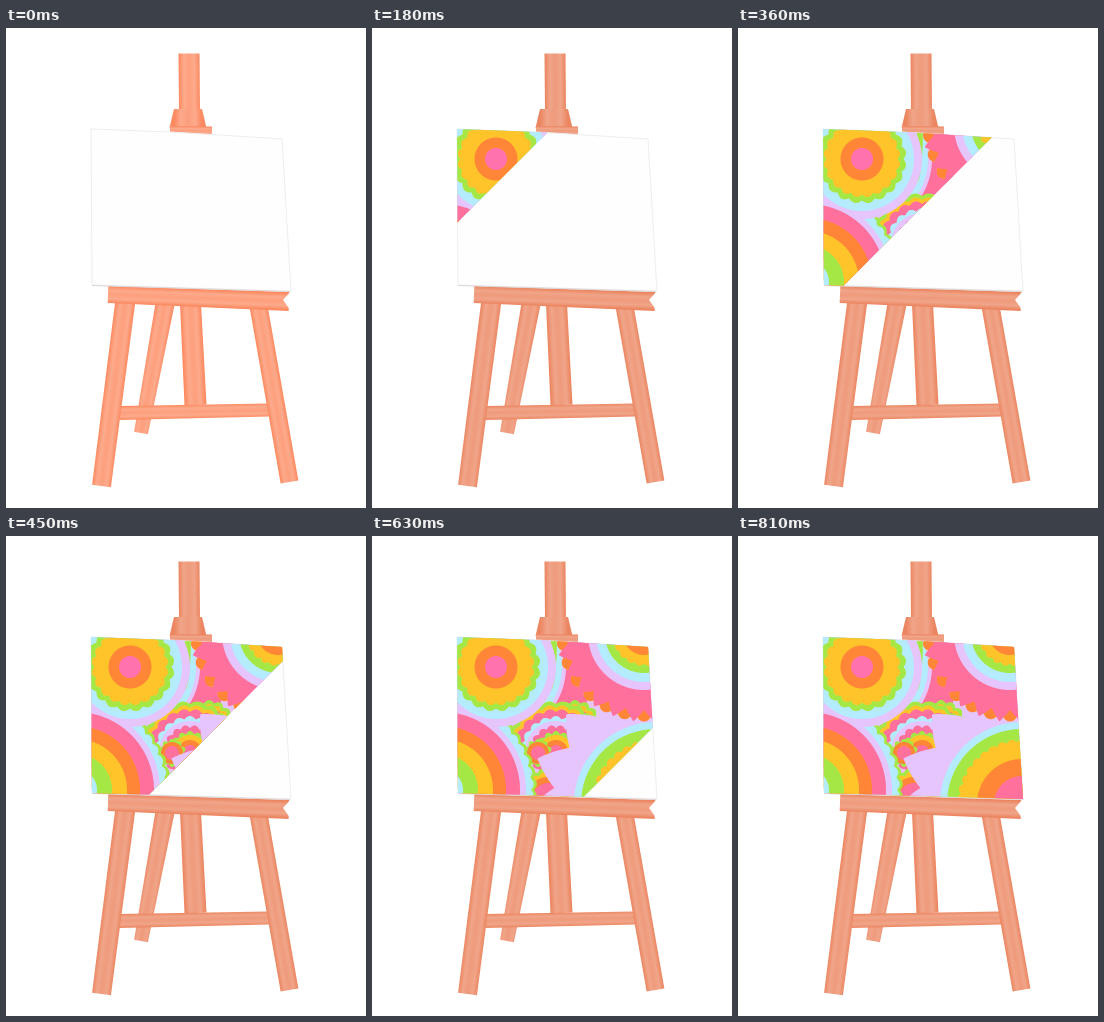
An HTML page with a canvas for the animation above (0.9 s loop, 360 by 480 pixels).

```html
<!DOCTYPE html>
<html lang="en">
<head>
<meta charset="utf-8">
<title>Easel</title>
<style>
html, body { margin: 0; width: 100%; height: 100%; overflow: hidden; background: #fff; }
canvas { display: block; width: 360px; height: 480px; }
</style>
</head>
<body>
<canvas id="stage" width="360" height="480"></canvas>
<script>
const ctx = document.getElementById('stage').getContext('2d');
const TAU = Math.PI * 2;
const STEP_MS = 90;
const STEPS = 10;

const PINK = '#ff709c', HUB = '#ff72ad', ORANGE = '#ff8636', YELLOW = '#ffc42a';
const GREEN = '#a5e846', SKY = '#b4ecfe', LILAC = '#e5c5fb';

const BOARD = [[85, 101], [164, 104], [206, 106.5], [276, 111], [285, 263], [86, 257]];

function path(points) {
  ctx.beginPath();
  points.forEach(([x, y]) => ctx.lineTo(x, y));
  ctx.closePath();
}

function fill(color) {
  ctx.fillStyle = color;
  ctx.fill();
}

function within(points, draw) {
  ctx.save();
  path(points);
  ctx.clip();
  draw();
  ctx.restore();
}

// Concentric shapes around one point; each edge is given by its radius at an angle.
function flower(x, y) {
  const outline = (color, radiusAt) => {
    ctx.beginPath();
    for (let i = 0; i < 720; i++) {
      const a = i / 720 * TAU, r = radiusAt(a);
      ctx.lineTo(x + r * Math.cos(a), y + r * Math.sin(a));
    }
    fill(color);
  };
  const self = {
    ring(color, r) {
      outline(color, () => r);
      return self;
    },
    scallop(color, r, lobes, depth = 3) {
      outline(color, a => r - depth * (1 - Math.abs(Math.sin(a * lobes / 2))));
      return self;
    },
    spikes(color, r, count, depth, tilt = 0) {
      outline(color, a => {
        const phase = (a - tilt + TAU) * count / TAU % 1;
        return r - depth * (1 - Math.abs(2 * phase - 1));
      });
      return self;
    },
    beads(color, distance, count, r) {
      for (let i = 0; i < count; i++) {
        const a = (i + 0.5) / count * TAU;
        flower(x + distance * Math.cos(a), y + distance * Math.sin(a)).ring(color, r);
      }
      return self;
    }
  };
  return self;
}

function paintArt() {
  ctx.fillStyle = LILAC;
  ctx.fillRect(80, 95, 210, 175);
  const upperLeft = flower(124, 131), lowerLeft = flower(70, 254);
  const upperRight = flower(272, 98), lowerRight = flower(284, 268);

  // Bands between the two upper flowers
  within([[170, 95], [215, 95], [215, 180], [165, 180]], () => {
    upperLeft.ring(PINK, 120).ring(LILAC, 70).ring(SKY, 66);
    ctx.beginPath();
    ctx.ellipse(181, 122, 3.5, 32, 0.05, 0, TAU);
    fill(GREEN);
  });

  // Layered blossoms in the middle
  flower(203, 190).scallop(GREEN, 26, 14).scallop(YELLOW, 22, 14).ring(PINK, 17);
  flower(184, 216).scallop(GREEN, 51, 20).scallop(YELLOW, 47, 20).scallop(PINK, 43, 20)
    .scallop(SKY, 36, 18).ring(LILAC, 31).scallop(PINK, 27, 16)
    .scallop(GREEN, 21, 14).ring(YELLOW, 17).ring(ORANGE, 12).ring(PINK, 7);
  flower(176, 262).scallop(GREEN, 30, 16).scallop(YELLOW, 26, 16).ring(ORANGE, 21).ring(PINK, 15);
  flower(166, 217).scallop(GREEN, 14, 10).ring(ORANGE, 11).ring(PINK, 7);

  // Left flowers overlap: outer bands first, then the cores
  lowerLeft.scallop(GREEN, 95, 46).scallop(SKY, 92, 46).ring(LILAC, 84);
  upperLeft.ring(LILAC, 60);
  lowerLeft.ring(PINK, 78).ring(ORANGE, 64).ring(YELLOW, 51).ring(GREEN, 36).ring(SKY, 21);
  upperLeft.ring(SKY, 52).scallop(GREEN, 44.5, 20).scallop(YELLOW, 38.5, 20)
    .ring(ORANGE, 21.5).ring(HUB, 11);

  lowerRight.spikes(LILAC, 127, 15, 24, 9 / 360 * TAU);
  upperRight.beads(YELLOW, 79, 26, 8).beads(ORANGE, 81, 26, 6.5).spikes(PINK, 88, 26, 12)
    .ring(LILAC, 56).ring(SKY, 48).ring(GREEN, 39).scallop(YELLOW, 32, 20, 2.5).ring(ORANGE, 21);
  lowerRight.ring(SKY, 82).ring(GREEN, 75).scallop(YELLOW, 65, 38).ring(ORANGE, 45).ring(PINK, 28);
}

// Tapered round bar, shaded across its width.
function bar(x0, y0, x1, y1, w0, w1, light) {
  const length = Math.hypot(x1 - x0, y1 - y0);
  const nx = (y1 - y0) / length / 2, ny = (x0 - x1) / length / 2;
  const g = ctx.createLinearGradient(x0 - nx * w0, y0 - ny * w0, x0 + nx * w0, y0 + ny * w0);
  for (let i = 0; i <= 4; i++) {
    const tone = light + (i % 4 ? 3 : -3) + (i % 2 ? 3 : 0);
    g.addColorStop(i / 4, `hsl(16 ${light > 70 ? 96 : 78}% ${tone}%)`);
  }
  path([
    [x0 - nx * w0, y0 - ny * w0], [x0 + nx * w0, y0 + ny * w0],
    [x1 + nx * w1, y1 + ny * w1], [x1 - nx * w1, y1 - ny * w1]
  ]);
  fill(g);
}

function drawEasel(light) {
  bar(159, 276, 135, 405, 19, 14, light);
  bar(184.5, 276, 189.5, 377, 21, 22, light);
  bar(113, 385, 263, 382, 14, 13, light);
  bar(119.5, 272, 95.5, 458, 20, 19, light);
  bar(252.5, 278, 283.5, 454, 18, 18, light);
  bar(183, 25.5, 183.5, 85, 21, 21, light);
  bar(182, 81, 182, 100, 28, 37, light);
  bar(164, 102.5, 206, 103, 9, 9, light);
  bar(102, 266.5, 283, 273.5, 17, 19, light);
  path([[285, 263], [277, 272], [285, 283]]);
  fill('#fff');
}

function drawBoard(step) {
  path(BOARD);
  fill('#fdfefd');
  ctx.lineWidth = 1;
  ctx.strokeStyle = '#eeeeef';
  ctx.stroke();
  ctx.beginPath();
  ctx.moveTo(86, 257.5);
  ctx.lineTo(284, 263.5);
  ctx.strokeStyle = '#dfd5d5';
  ctx.stroke();
  if (step === 0) return;

  // The paint spreads behind a slowing diagonal x + y = limit
  const limit = step === STEPS - 1 ? 600 : 188 + 48 * step - 1.05 * step * step;
  within(BOARD, () => within([[0, 0], [limit, 0], [0, limit]], paintArt));
}

function frame(now) {
  const step = Math.floor(now / STEP_MS) % STEPS;
  ctx.fillStyle = '#fff';
  ctx.fillRect(0, 0, 360, 480);
  drawEasel(step ? 68 : 71);
  drawBoard(step);
  requestAnimationFrame(frame);
}

frame(0);
</script>
</body>
</html>
```
